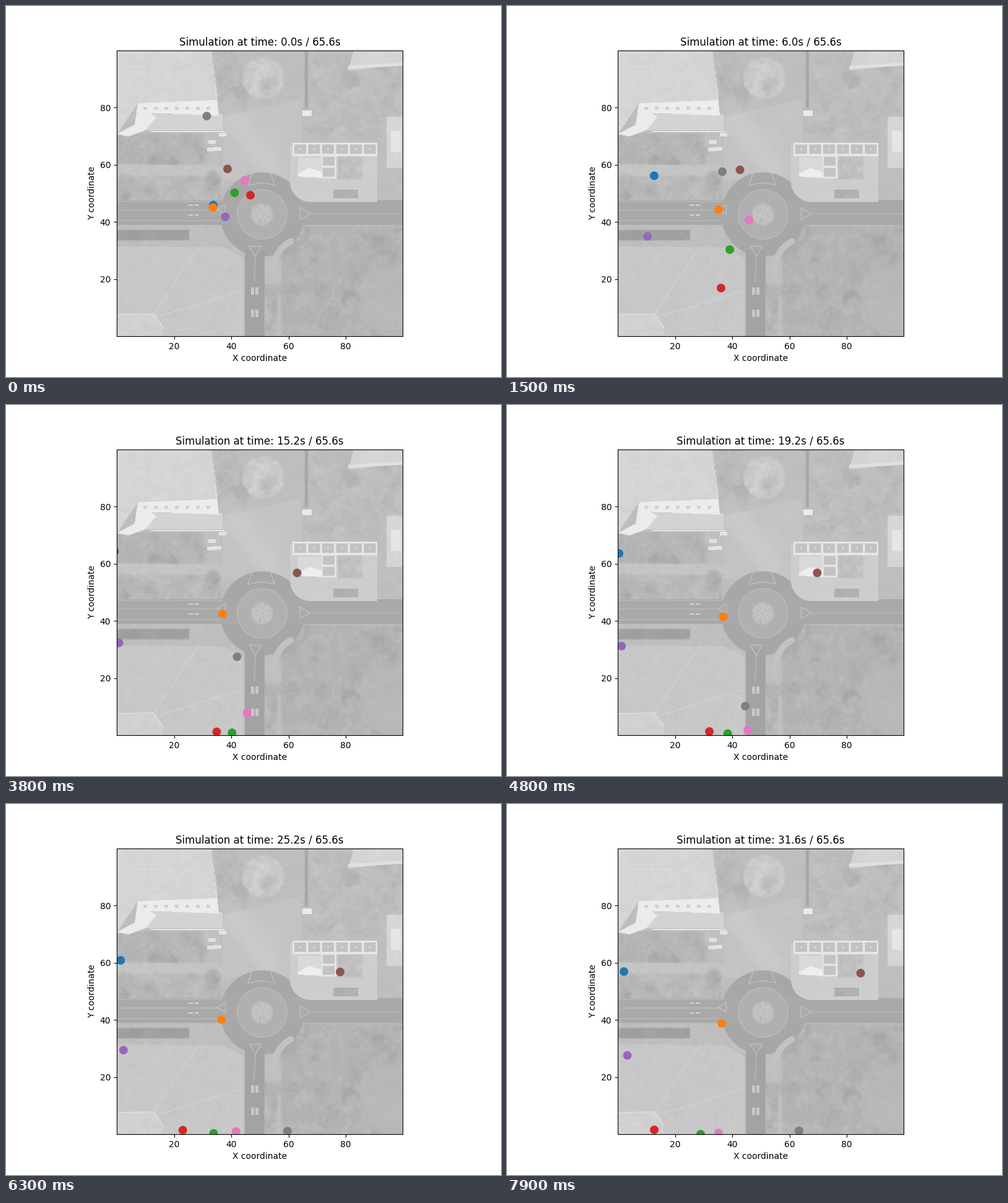
Animation, 800 px wide and 600 px high, one loop 8 s. Source, as a matplotlib script:

```python
import numpy as np
import matplotlib.pyplot as plt
from matplotlib.animation import FuncAnimation
from matplotlib.path import Path
from matplotlib.transforms import Affine2D

FRAMES, INTERVAL, STEP, TOTAL = 80, 100, 0.4, 65.6
LEFT, TOP, SIDE = 179, 72, 462
RIGHT, BOTTOM = LEFT + SIDE, TOP + SIDE
rng = np.random.default_rng(4)

# ---- soft grey aerial view, painted in stage pixels ----
Y, X = np.mgrid[TOP:BOTTOM, LEFT:RIGHT] + 0.5


def noise(cell):
    """Smooth noise around zero with blotches of the given size."""
    n = int(SIDE / cell) + 3
    grid = rng.normal(size=(n, n))
    u = np.arange(SIDE) / cell
    i = u.astype(int)
    f = u - i
    rows = grid[i] * (1 - f)[:, None] + grid[i + 1] * f[:, None]
    return rows[:, i] * (1 - f) + rows[:, i + 1] * f


FINE = noise(1.6)
LEAF = 0.35 * FINE + 0.6 * noise(5) + 0.6 * noise(16)
photo = 190 + 2 * LEAF


def blend(mask, tone, grain=0.0):
    photo[:] += mask * (tone + grain * LEAF - photo)


def disc(cx, cy, r, tone, grain=0.0, soft=1.0, alpha=1.0):
    edge = (r - np.hypot(X - cx, Y - cy)) / soft + 0.5
    blend(alpha * np.clip(edge, 0, 1), tone, grain)


def box(x0, y0, x1, y1, tone, grain=0.0, soft=1.0):
    dx = np.minimum(X - x0, x1 - X)
    dy = np.minimum(Y - y0, y1 - Y)
    blend(np.clip(np.minimum(dx, dy) / soft + 0.5, 0, 1), tone, grain)


def shape(points, tone, grain=0.0):
    inside = Path(points).contains_points(np.column_stack([X.ravel(), Y.ravel()]))
    m = np.pad(inside.reshape(X.shape).astype(float), 1, mode="edge")
    m = (m[:-2, 1:-1] + m[2:, 1:-1] + m[1:-1, :-2] + m[1:-1, 2:] + 4 * m[1:-1, 1:-1]) / 8
    blend(m, tone, grain)


def stroke(points, tone, w=1.2, alpha=1.0):
    pts = np.array(points, float)
    for (ax0, ay0), (dx, dy) in zip(pts[:-1], np.diff(pts, axis=0)):
        t = np.clip(((X - ax0) * dx + (Y - ay0) * dy) / (dx * dx + dy * dy), 0, 1)
        dist = np.hypot(X - ax0 - t * dx, Y - ay0 - t * dy)
        blend(alpha * np.clip(w / 2 + 0.5 - dist, 0, 1), tone)


def trees(x0, y0, x1, y1, tone, count):
    box(x0, y0, x1, y1, tone + 4, grain=4, soft=4)
    for _ in range(count):
        disc(rng.uniform(x0, x1), rng.uniform(y0, y1), rng.uniform(7, 16),
             tone + rng.normal(0, 6), grain=5, soft=6, alpha=0.6)


def triangle(cx, cy, r, turn):
    a = turn + np.arange(4) * 2 * np.pi / 3
    stroke(np.column_stack([cx + r * np.cos(a), cy + r * np.sin(a)]), 196)


def paint_greenery():
    trees(342, TOP, 384, 180, 182, 10)
    trees(490, 80, 635, 215, 185, 30)
    trees(LEFT, 206, 320, 256, 177, 12)
    box(LEFT, 257, 350, 274, 196, 2, 3)
    trees(LEFT, 276, 348, 313, 181, 20)
    trees(445, 356, RIGHT, BOTTOM, 176, 75)
    disc(640, 480, 65, 184, 2, 20)
    box(483, TOP, 488, 165, 166, soft=3)
    disc(416, 117, 34, 200, 6, 4)
    disc(424, 128, 12, 188, 6, 10)


def paint_roads():
    shape([(350, 180), (478, 150), (478, 290), (350, 280)], 196, 1)
    for k in range(6):
        disc(365 + 13 * k, 178 + 17 * k, 16, 205, soft=24, alpha=0.5)
    disc(414, 337, 68, 167, soft=2)
    box(LEFT, 314, RIGHT, 354, 169)
    box(386, 395, 418, BOTTOM, 163)
    box(LEFT, 362, 296, 379, 160, 3, 3)
    for y, x in ((330, 345), (347, 345), (316, 350)):
        stroke([(LEFT, y), (x, y)], 188)
    stroke([(494, 336), (RIGHT, 336)], 182)
    for x in (295, 305):
        for y in (321, 337):
            box(x, y, x + 7, y + 2, 213)
    # central island
    disc(414, 337, 41, 183)
    disc(414, 337, 39, 176)
    disc(414, 337, 18, 188, 6, 3)
    for a in np.arange(8) * np.pi / 4:
        stroke([(414 + r * np.cos(a), 337 + r * np.sin(a)) for r in (4, 13)], 204, 2, 0.6)
    # splitter islands
    triangle(481, 336, 11, 0)
    triangle(403, 394, 11, np.pi / 2)
    triangle(350, 329, 9, np.pi)
    stroke([(400, 264), (391, 290), (412, 286), (434, 289), (425, 264)], 194)
    stroke([(403, 405), (401, 446)], 186)
    # curved path and lane marks
    arc = np.linspace(np.pi, 1.35 * np.pi, 6)
    stroke(np.column_stack([483 + 50 * np.cos(arc), 425 + 50 * np.sin(arc)]), 194, 10)
    box(418, 450, 438, BOTTOM, 180, 6, 2)
    for y in (455, 491):
        for x in (396, 403):
            box(x, y, x + 5, y + 12, 200)


def paint_houses():
    # north-west house with its white wall
    shape([(LEFT, TOP), (332, TOP), (340, 152), (213, 157), (LEFT, 208)], 213, 2)
    stroke([(LEFT, 103), (295, 100), (325, TOP)], 205)
    box(225, 175, 350, 201, 211, 1)
    shape([(213, 157), (340, 152), (334, 80), (344, 177), (222, 173)], 236)
    shape([(LEFT, 207), (208, 192), (213, 157), (243, 180), (225, 201), (198, 211)], 235)
    for x in range(222, 335, 17):
        box(x, 163, x + 6, 168, 208)
    stroke([(235, 203), (352, 203)], 230, 2)
    for x, y in ((333, 220), (331, 232), (342, 231), (350, 208)):
        box(x - 6, y - 3, x + 6, y + 3, 228)
    # south-west roof
    shape([(LEFT, 389), (350, 390), (383, 407), (384, BOTTOM), (LEFT, BOTTOM)], 199, 2)
    for k in range(1, 15):
        stroke([(250 + 9 * k, 501 - 2.8 * k), (253 + 9 * k, BOTTOM)], 206, 1, 0.4)
        stroke([(LEFT, 390 + 7 * k), (LEFT + 9 * k, 389)], 204, 1, 0.4)
    for a, b in (((312, 389), (237, 500)), ((240, 504), (383, 460))):
        stroke([a, b], 211)
    shape([(LEFT, 499), (238, 498), (254, 520), (252, BOTTOM), (LEFT, BOTTOM)], 209, 3)
    stroke([(LEFT, 499), (238, 498), (254, 520)], 222, 1.5)
    # eastern yard with a rounded corner
    disc(492, 284, 33, 205)
    box(459, 225, 492, 284, 205)
    box(492, 225, 600, 317, 205, 1)
    box(529, 297, 569, 311, 176, 3)
    box(536, 243, 576, 280, 192, 6, 3)
    # glazed frame
    box(463, 221, 600, 243, 230)
    box(509, 242, 534, 279, 228)
    for k in range(6):
        x = 466 + 22.5 * k
        box(x, 224, x + 19, 239, 194)
        disc(x + 9.5, 231.5, 1.5, 222)
    for y in (244, 262):
        box(512, y, 531, y + 14, 196)
    box(472, 245, 510, 276, 217)
    shape([(471, 272), (490, 262), (510, 268), (510, 278), (473, 276)], 238)
    # northern and eastern houses
    shape([(562, TOP), (RIGHT, TOP), (RIGHT, 95), (553, 104)], 212, 2)
    stroke([(555, 99), (RIGHT, 94)], 224, 5)
    box(615, 179, RIGHT, 262, 212, 2)
    box(622, 202, 638, 236, 230, soft=3)
    box(479, 169, 494, 178, 234)


paint_greenery()
paint_roads()
paint_houses()

# ---- plot ----
fig, ax = plt.subplots(figsize=(8, 6), dpi=100)
ax.set_box_aspect(1)
ax.imshow(photo, cmap="gray", vmin=0, vmax=255, extent=(0, 99.85, 0, 100),
          interpolation="nearest", aspect="auto")
ticks = [20, 40, 60, 80]
ax.set(xlim=(0, 99.85), ylim=(0, 100), xticks=ticks, yticks=ticks,
       xlabel="X coordinate", ylabel="Y coordinate")
title = ax.set_title("")
to_stage = Affine2D().translate(-LEFT, -BOTTOM).scale(1 / SIDE, -1 / SIDE) + ax.transAxes


def glide(t, k, v):
    """Monotone cubic through the values v at times k."""
    h = np.diff(k)
    d = np.diff(v) / h
    a, b = d[:-1], d[1:]
    mid = np.where(a * b > 0, 2 * a * b / np.where(a + b == 0, 1, a + b), 0)
    m = np.r_[d[0], mid, d[-1]]
    i = np.clip(np.searchsorted(k, t, side="right") - 1, 0, len(h) - 1)
    s = (t - k[i]) / h[i]
    return (v[i] + h[i] * m[i] * s * (1 - s) ** 2 - h[i] * m[i + 1] * s * s * (1 - s)
            + (v[i + 1] - v[i]) * s * s * (3 - 2 * s))


seconds = np.arange(FRAMES) * INTERVAL / 1000


def walk(*keys):
    """Path of one dot through a few (seconds, x, y) turning points."""
    k, x, y = np.array(keys, float).T
    return np.column_stack([glide(seconds, k, x), glide(seconds, k, y)])


walks = [
    walk((0, 335, 322), (2.7, 186, 246.5), (3.8, 175.5, 237), (4.8, 181, 240),
         (7.9, 189, 271)),
    walk((0, 334.5, 326), (2.7, 347, 332), (3.8, 350, 338), (7.9, 347, 355)),
    walk((0, 369.5, 302), (1.5, 360, 394), (3.2, 367, 529), (7.9, 313, 534)),
    walk((0, 395, 306), (0.9, 361, 384), (1.8, 343, 494), (2.1, 345, 530),
         (3.8, 340.5, 528.5), (7.9, 238, 527)),
    walk((0, 354.5, 341), (0.9, 274, 363), (1.8, 207, 375.5), (2.3, 181, 377.5),
         (7.9, 194.5, 406.5)),
    walk((0, 358, 263.5), (1.5, 376.5, 265), (3.8, 470.5, 271.5), (6.3, 540, 271.5),
         (7.9, 571.5, 273.5)),
    walk((0, 386, 282), (1.5, 391, 346), (2.7, 390, 438.5), (4.8, 389, 526),
         (7.9, 342, 532)),
    walk((0, 324.5, 178), (1.5, 348, 268), (2.7, 363.5, 328.5), (4.8, 385, 487),
         (5.3, 405, 527), (6.3, 455, 529), (7.9, 472, 528.5)),
]
paths = np.stack(walks, axis=1)
dots = ax.scatter(*paths[0].T, s=100, linewidths=0, transform=to_stage,
                  c=[f"C{i}" for i in range(len(walks))])


def draw(i):
    title.set_text(f"Simulation at time: {i * STEP:.1f}s / {TOTAL}s")
    dots.set_offsets(paths[i])
    return title, dots


anim = FuncAnimation(fig, draw, frames=FRAMES, interval=INTERVAL, repeat=True,
                     repeat_delay=0)
plt.show()
```
